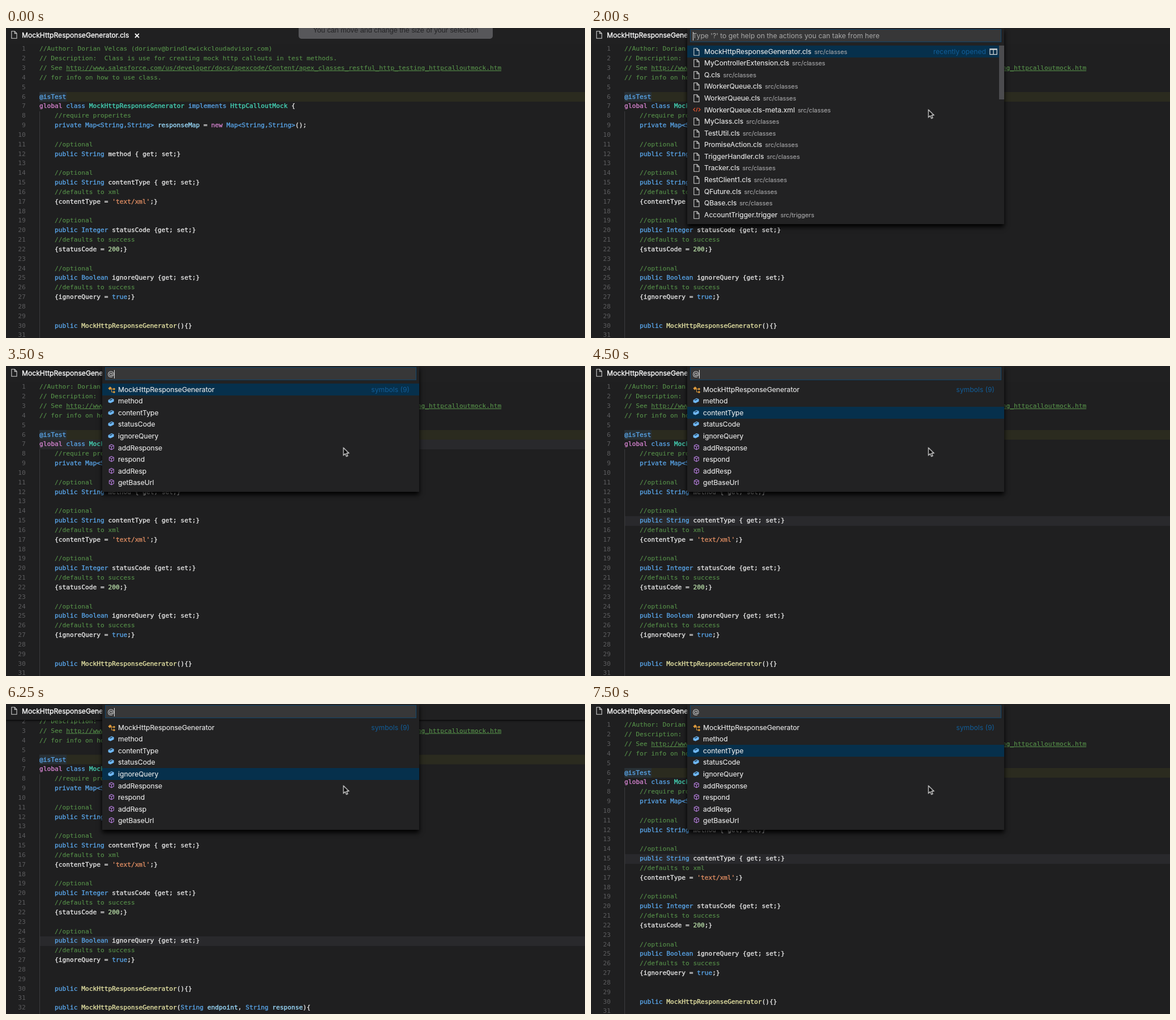
An HTML page for the animation above (8 s loop, 1023 px wide and 547 px high).

```html
<!DOCTYPE html>
<html lang="en">
<head>
<meta charset="utf-8">
<title>Go to symbol</title>
<style>
:root { --line: 16.83px; --row: 20.57px; }
html, body { margin: 0; width: 100%; height: 100%; overflow: hidden; background: #1f1f20; }
#stage {
  position: relative; width: 1023px; height: 547px; overflow: hidden; background: #1f1f20;
  font: 12.15px/var(--row) Inter, "Open Sans", sans-serif; color: #e8e8e8;
}
#stage * { box-sizing: border-box; }
#stage div, #stage svg { position: absolute; white-space: pre; }
.anim { animation: 8s step-end infinite; }

/* editor */
#code {
  left: 0; top: 28.9px; width: 100%; height: 560px; animation-name: scroll;
  font: 11.21px/var(--line) "DejaVu Sans Mono", Menlo, monospace; color: #e6e6e6;
}
.num, .src { margin-top: .6px; }
.num { left: 0; width: 34.7px; text-align: right; color: #5c5c5e; }
.src { left: 59px; -webkit-text-stroke: .35px; }
.c, .u { color: #57924a; -webkit-text-stroke: .1px; }
.u { text-decoration: underline; }
.k { color: #58a3e6; }
.p { color: #d080cb; }
.t { color: #45d4b6; }
.f { color: #e5e3a4; }
.v { color: #9cdcfe; }
.s { color: #dd8c62; }
.n { color: #b2d6a2; }
.band { left: 59px; right: 0; height: var(--line); }
#test { top: calc(5 * var(--line)); background: #2b2b1f; }
#picked { left: 59px; top: calc(5 * var(--line)); width: 47.5px; height: var(--line); background: #283035; }
#current { background: #29292c; animation-name: line; }
#guide { left: 59px; top: calc(7 * var(--line)); width: 1px; bottom: 0; background: #3b3b3d; }
#caret { left: 106.5px; top: calc(5 * var(--line)); width: 2px; height: var(--line); background: #b5b5b5; animation-name: caret; }

/* tab bar */
#tabs { left: 0; top: 0; width: 100%; height: 28px; background: #202021; animation-name: shade; }
#title { left: 28px; top: 2.6px; color: #fff; -webkit-text-stroke: .3px; }

/* notice */
#notice {
  left: 517px; top: -20px; width: 343px; height: 38.5px; border-radius: 5px; background: #57575a;
  color: #242426; font: 12.65px/16px "Liberation Sans", Arial, sans-serif; text-align: center;
  padding-top: 16px; animation-name: notice;
}

/* picker */
#picker {
  left: 170px; top: 0; width: 560px; overflow: visible; background: #222223;
  box-shadow: 0 5px 8px #000; animation-name: picker;
}
#input { left: 5px; top: 2px; width: 550px; height: 23px; background: #373738; border: 1px solid #0f4469; }
#input div { left: 3.5px; top: 1.4px; }
#hint { color: #a8a8a8; animation-name: files; }
#typed { color: #e0e0e0; animation-name: symbols-typed; }
#stage #bar { top: 4px; width: 1.2px; height: 14.5px; background: #e4e4e4; animation-name: bar; }
.list { left: 0; top: 31.2px; width: 100%; }
#files { animation-name: files; }
#symbols { animation-name: symbols; }
.row { left: 0; width: 100%; height: var(--row); -webkit-text-stroke: .15px; }
.row svg { left: 10px; top: 3.4px; }
.row span { position: absolute; left: 30px; top: .6px; }
.row i { font-style: normal; font-size: 10.9px; color: #a3a3a5; margin-left: 5px; }
#symbols .row span { left: 28px; }
.pick { left: 0; top: 0; width: 100%; height: var(--row); background: #06304c; }
#choice { animation-name: choice; }
.note { top: .6px; right: 17px; color: #115d98; }
#thumb { right: 0; top: 0; width: 9px; height: 95px; background: #4b4b4e; }
#pointer { animation-name: pointer; }

@keyframes notice { 0% { visibility: visible } 3.125%, 100% { visibility: hidden } }
@keyframes caret { 0% { visibility: hidden } 15.625% { visibility: visible } 21.875%, 100% { visibility: hidden } }
@keyframes pointer {
  0% { visibility: hidden; transform: translate(656px, 36px) }
  6.25% { visibility: visible; transform: translate(656px, 36px) }
  12.5% { visibility: visible; transform: translate(606px, 126.5px) }
  15.625%, 100% { visibility: visible; transform: translate(596.3px, 144.3px) }
}
@keyframes picker {
  0% { visibility: hidden; height: 346px }
  25% { visibility: visible; height: 346px }
  31.25% { visibility: visible; height: 30px }
  34.375%, 100% { visibility: visible; height: 222px }
}
@keyframes files { 0% { visibility: hidden } 25% { visibility: visible } 31.25%, 100% { visibility: hidden } }
@keyframes symbols-typed { 0% { visibility: hidden } 31.25%, 100% { visibility: visible } }
@keyframes symbols { 0% { visibility: hidden } 34.375%, 100% { visibility: visible } }
@keyframes bar {
  0% { left: 3.5px; opacity: 1 }
  31.25% { left: 15px; opacity: 1 }
  50%, 62.5%, 84.375% { left: 15px; opacity: 0 }
  56.25%, 68.75%, 87.5% { left: 15px; opacity: 1 }
  93.75%, 100% { left: 15px; opacity: 0 }
}
@keyframes choice {
  0% { top: 0; opacity: 0 }
  43.75% { top: 0; opacity: 1 }
  50% { top: var(--row); opacity: 1 }
  56.25% { top: calc(2 * var(--row)); opacity: 1 }
  68.75%, 84.375% { top: calc(3 * var(--row)); opacity: 1 }
  75% { top: calc(4 * var(--row)); opacity: 1 }
  87.5%, 100% { top: calc(2 * var(--row)); opacity: 1 }
}
@keyframes line {
  0% { top: 0; opacity: 0 }
  43.75% { top: calc(6 * var(--line)); opacity: 1 }
  50% { top: calc(11 * var(--line)); opacity: 1 }
  56.25% { top: calc(14 * var(--line)); opacity: 1 }
  68.75%, 84.375% { top: calc(19 * var(--line)); opacity: 1 }
  78.125% { top: calc(24 * var(--line)); opacity: 1 }
  87.5%, 100% { top: calc(14 * var(--line)); opacity: 1 }
}
@keyframes scroll { 0% { transform: none } 78.125% { transform: translateY(-23.5px) } 84.375%, 100% { transform: none } }
@keyframes shade { 0% { box-shadow: none } 78.125% { box-shadow: 0 1px 3px #000 } 84.375%, 100% { box-shadow: none } }
</style>
</head>
<body>
<svg width="0" height="0" style="position:absolute">
  <symbol id="file" viewBox="0 0 14 14"><path d="M1.8 .8H7.4L11 4.4V13.2H1.8ZM7.2 .8V4.6H11" fill="none" stroke="#cfcfcf" stroke-width="1.1"/></symbol>
  <symbol id="xml" viewBox="0 0 14 14"><path d="M4 4 1 7 4 10M10 4 13 7 10 10M8 3.5 6 10.5" fill="none" stroke="#d4502e" stroke-width="1.4"/></symbol>
  <symbol id="class" viewBox="0 0 14 14"><path d="M.4 4.6 4 1.2 7 4 3.4 7.6ZM8.6 5.6 10.9 3.4 13.2 5.6 10.9 7.9ZM8.6 11 10.9 8.8 13.2 11 10.9 13.2Z" fill="#dd9a3c"/><path d="M5 5.7H9M6.6 5.7V11H9" fill="none" stroke="#dd9a3c"/></symbol>
  <symbol id="field" viewBox="0 0 14 14"><path d="M.6 5 6.6 1.8 10.6 3.4V7.4L4.6 10.6 .6 9Z" fill="#6fb8f5"/><path d="M2.2 5.2 6.6 3 8.8 3.8 4.6 6Z" fill="#26455f"/></symbol>
  <symbol id="method" viewBox="0 0 14 14"><path d="M6.4 1.4 10.4 3.4V8.4L6.4 10.6 2.4 8.4V3.4ZM2.4 3.5 6.4 5.7 10.4 3.5M6.4 5.7V10.6" fill="none" stroke="#b07ad6" stroke-width="1.1"/></symbol>
</svg>
<div id="stage">
  <div id="code" class="anim">
    <div id="test" class="band"></div>
    <div id="picked"></div>
    <div id="current" class="band anim"></div>
    <div id="guide"></div>
    <div id="caret" class="anim"></div>
  </div>
  <div id="tabs" class="anim">
    <svg width="14" height="14" style="left:8px;top:5px"><use href="#file"/></svg>
    <div id="title">MockHttpResponseGenerator.cls</div>
    <svg width="9" height="9" style="left:227px;top:9px"><path d="M1 1 8 8M8 1 1 8" stroke="#f2f2f2" stroke-width="1.8"/></svg>
  </div>
  <div id="notice" class="anim">You can move and change the size of your selection</div>
  <div id="picker" class="anim">
    <div id="input">
      <div id="hint" class="anim">Type '?' to get help on the actions you can take from here</div>
      <div id="typed" class="anim">@</div>
      <div id="bar" class="anim"></div>
    </div>
    <div id="files" class="list anim">
      <div class="pick"></div>
      <div id="thumb"></div>
      <div class="note" style="right:32px">recently opened</div>
      <svg width="14" height="12" style="left:534px;top:5px"><path d="M.8 1H13.2V10.6H.8ZM7 1V10.6M.8 2H13.2" fill="none" stroke="#d5d5d5" stroke-width="1.3"/></svg>
    </div>
    <div id="symbols" class="list anim">
      <div id="choice" class="pick anim"></div>
      <div class="note">symbols (9)</div>
    </div>
  </div>
  <svg id="pointer" class="anim" width="14" height="20" style="left:0;top:0;overflow:visible">
    <path d="M0 0V13.2L3.1 10.4 5.2 15.3 7.5 14.3 5.4 9.5H9.5Z" fill="#000" stroke="#fff" stroke-width="1.1"/>
  </svg>
</div>
<script>
const source = `//Author: Dorian Velcas (dorianv@brindlewickcloudadvisor.com)
// Description:  Class is use for creating mock http callouts in test methods.
// See http://www.salesforce.com/us/developer/docs/apexcode/Content/apex_classes_restful_http_testing_httpcalloutmock.htm
// for info on how to use class.

@isTest
global class MockHttpResponseGenerator implements HttpCalloutMock {
    //require properites
    private Map<String,String> responseMap = new Map<String,String>();

    //optional
    public String method { get; set;}

    //optional
    public String contentType { get; set;}
    //defaults to xml
    {contentType = 'text/xml';}

    //optional
    public Integer statusCode {get; set;}
    //defaults to success
    {statusCode = 200;}

    //optional
    public Boolean ignoreQuery {get; set;}
    //defaults to success
    {ignoreQuery = true;}


    public MockHttpResponseGenerator(){}

    public MockHttpResponseGenerator(String endpoint, String response){
`;

// Each named group is also the CSS class of its token.
const token = new RegExp([
  "(?<u>http:\\S+)",
  "(?<c>//.*?(?=http:|$))",
  "(?<k>@isTest|Map<String,String>|\\b(?:private|public|class|implements|String|Integer|Boolean|true)\\b)",
  "(?<p>\\b(?:global|new)\\b)",
  "(?<f>MockHttpResponseGenerator(?=\\())",
  "(?<t>MockHttpResponseGenerator|HttpCalloutMock)",
  "(?<v>\\b(?:responseMap|endpoint|response)\\b)",
  "(?<s>'.*?')",
  "(?<n>\\b\\d+\\b)"
].join("|"), "g");

const $ = id => document.getElementById(id);

const paint = text => text.replace(token, (match, ...rest) => {
  const groups = rest.pop();
  const kind = Object.keys(groups).find(name => groups[name] !== undefined);
  return `<span class="${kind}">${match.replace(/</g, "&lt;")}</span>`;
});

function addLine(text, i) {
  const top = `style="top:calc(${i} * var(--line))"`;
  $("code").insertAdjacentHTML("beforeend",
    `<div class="num" ${top}>${i + 1}</div><div class="src" ${top}>${paint(text)}</div>`);
}

function addRow(list, i, icon, name, folder) {
  const path = folder ? `<i>${folder}</i>` : "";
  $(list).insertAdjacentHTML("beforeend",
    `<div class="row" style="top:calc(${i} * var(--row))">` +
    `<svg width="14" height="14"><use href="#${icon}"/></svg><span>${name}${path}</span></div>`);
}

source.split("\n").forEach(addLine);

const files = ["MockHttpResponseGenerator.cls", "MyControllerExtension.cls", "Q.cls", "IWorkerQueue.cls",
  "WorkerQueue.cls", "IWorkerQueue.cls-meta.xml", "MyClass.cls", "TestUtil.cls", "PromiseAction.cls",
  "TriggerHandler.cls", "Tracker.cls", "RestClient1.cls", "QFuture.cls", "QBase.cls", "AccountTrigger.trigger"];
files.forEach((name, i) => addRow("files", i, name.endsWith("xml") ? "xml" : "file", name,
  name.endsWith("trigger") ? "src/triggers" : "src/classes"));

const symbols = ["MockHttpResponseGenerator", "method", "contentType", "statusCode", "ignoreQuery",
  "addResponse", "respond", "addResp", "getBaseUrl"];
symbols.forEach((name, i) => addRow("symbols", i, i === 0 ? "class" : i < 5 ? "field" : "method", name));
</script>
</body>
</html>
```
